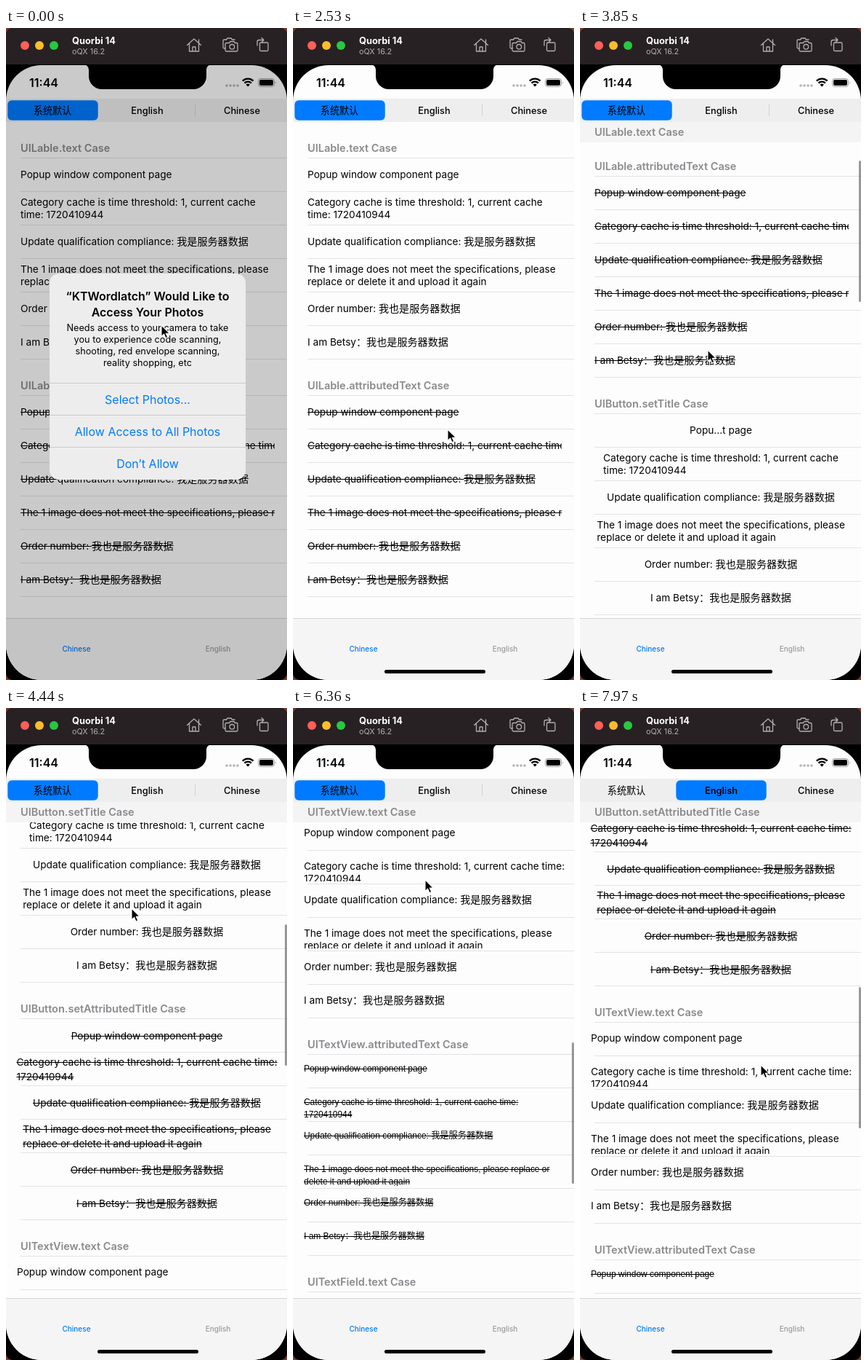
An HTML page for the animation above (8 s loop, 387 by 895 pixels).

```html
<!DOCTYPE html>
<html lang="en">
<head>
<meta charset="utf-8">
<title>Translated list demo</title>
<style>
  html, body { margin: 0; width: 100%; height: 100%; overflow: hidden; background: #7c3a2c; }
  #stage { position: relative; width: 387px; height: 895px; overflow: hidden; border-radius: 9px; background: #000;
    font-family: Inter, "Noto Sans CJK SC", "Noto Sans CJK", sans-serif; }
  #stage svg { position: absolute; left: 0; top: 0; }
  #screen { position: absolute; inset: 0; background: #fdfdfd; clip-path: inset(51px 0 0 round 49px); }
  #view { position: absolute; left: 0; top: 129px; width: 387px; height: 681px; overflow: hidden; }
  #list { position: absolute; left: 0; top: -129px; width: 100%; will-change: transform; }
  .head { position: absolute; left: 0; width: 367px; height: 28px; padding-left: 20px; color: #8a8a8e;
    font-size: 14.5px; font-weight: 600; line-height: 28px; white-space: pre; }
  #sticky { top: 0; background: #f4f4f4; }
  .line { position: absolute; left: 20px; right: 0; height: 1px; background: #e3e3e5; }
  .row { position: absolute; left: 20px; width: 350px; height: 45px; display: flex; align-items: center;
    overflow: hidden; white-space: pre; color: #000; font-size: 13.65px; line-height: 17px; }
  .row b { font-weight: 400; }
  .row i { font-style: normal; font-size: 1.033em; line-height: 1px; }
  .strike b { text-decoration: line-through 1.2px; }
  .mid { left: 0; width: 388px; justify-content: center; }
  .loose { line-height: 20px; }
  .box { left: 15px; width: 372px; height: 42px; align-items: flex-start; line-height: 16.5px; }
  .box b { margin-top: 13px; }
  .small { font-family: "Liberation Sans", "Noto Sans CJK SC", "Noto Sans CJK", sans-serif; font-size: 11.95px; }
  .small b { margin-top: 11px; }
  .small i { font-size: 1.02em; }
  #bar { position: absolute; right: 0; width: 3px; height: 194px; border-radius: 2px; background: rgba(0,0,0,.4); }
</style>
</head>
<body>
<div id="stage">
  <div id="screen">
    <div id="view">
      <div id="list"></div>
      <div id="sticky" class="head"></div>
      <div id="bar"></div>
    </div>
    <svg width="387" height="895" text-anchor="middle">
      <text x="52" y="80.5" font-size="16" font-weight="600">11:44</text>
      <path d="M304 79h16" stroke="#b4b4b6" stroke-width="3.6" stroke-linecap="round" stroke-dasharray="0 5"/>
      <path d="M325.8 72.6a10.5 10.5 0 0 1 14.8 0M328.5 75.6a6.6 6.6 0 0 1 9.4 0" fill="none" stroke="#000" stroke-width="2.3"/>
      <path d="M333.2 80.6l-2.7-2.8a3.8 3.8 0 0 1 5.4 0z"/>
      <rect x="347.5" y="69.5" width="22" height="11" rx="3.4" fill="none" stroke="#999"/>
      <rect x="349" y="71" width="19" height="8" rx="2"/>
      <path d="M371 73.2q1.8 1.8 0 3.6z" fill="#888"/>

      <rect y="97" width="387" height="32" fill="#eeeeef"/>
      <rect id="divider" x="260" y="105" width="1" height="16" fill="#d3d3d6"/>
      <rect id="pill" x="2" y="99" width="125" height="28" rx="6" fill="#007aff" stroke="#fff" stroke-opacity=".5"/>
      <g font-size="12.8" font-weight="500">
        <text id="segA" x="64" y="117.8" font-size="13.1">系统默认</text>
        <text id="segB" x="194.5" y="117.6">English</text>
        <text x="325" y="117.6">Chinese</text>
      </g>

      <rect y="810" width="387" height="85" fill="#f5f5f5"/>
      <rect y="810" width="387" height="1" fill="#d6d6d8"/>
      <g font-size="10" font-weight="500">
        <text x="97" y="856.3" fill="#007aff">Chinese</text>
        <text x="292" y="856.3" fill="#999">English</text>
      </g>
      <rect id="home" x="126" y="881" width="139" height="5" rx="2.5"/>
      <rect id="dim" y="50" width="387" height="845"/>

      <g id="alert">
        <rect x="60" y="337" width="270" height="283" rx="13" fill="#ededed"/>
        <rect id="press" x="60" y="532" width="270" height="43" fill="#d3d3d3"/>
        <path d="M60 487.5h270M60 531.5h270M60 575.5h270" stroke="#cbcbcd"/>
        <g font-size="16" font-weight="600">
          <text x="195" y="373.5">“KTWordlatch” Would Like to</text>
          <text x="195" y="395.5">Access Your Photos</text>
        </g>
        <g font-size="12.7">
          <text x="195" y="415.5">Needs access to your camera to take</text>
          <text x="195" y="431.5">you to experience code scanning,</text>
          <text x="195" y="447.5">shooting, red envelope scanning,</text>
          <text x="195" y="463.5">reality shopping, etc</text>
        </g>
        <g font-size="16" fill="#007aff">
          <text x="195" y="515.8">Select Photos...</text>
          <text x="195" y="559.8">Allow Access to All Photos</text>
          <text x="195" y="604.3">Don’t Allow</text>
        </g>
      </g>
    </svg>
  </div>
  <svg width="387" height="895">
    <rect width="387" height="50" fill="#272123"/>
    <path d="M106 50H284c-5 0-8 3-8 8v8a18 18 0 0 1-18 18H132a18 18 0 0 1-18-18v-8c0-5-3-8-8-8z"/>
    <circle cx="26" cy="24" r="6" fill="#ff5f57"/>
    <circle cx="46" cy="24" r="6" fill="#febc2e"/>
    <circle cx="66" cy="24" r="6" fill="#28c840"/>
    <text x="91" y="21.8" font-size="12.8" font-weight="700" fill="#fff">Quorbi 14</text>
    <text x="91" y="36" font-size="10.8" fill="#b3aeb0">oQX 16.2</text>
    <g fill="none" stroke="#b3aeb0" stroke-width="1.3" stroke-linejoin="round" stroke-linecap="round">
      <path d="M249.500 23.500L259 15l9.500 8.500M252.500 21.500V32h13V21.500M257 32v-6h4v6M265.500 20v-4"/>
      <path d="M302 28h-1.500q-1.500 0-1.500-1.500v-9q0-1.500 1.500-1.500h3l1.500-2h5l1.500 2h3.500"/>
      <path d="M303.500 20.500h4l1.500-2h5l1.500 2h2q1.500 0 1.500 1.500v8.500q0 1.500-1.500 1.500h-14q-1.500 0-1.500-1.500V22q0-1.500 1.500-1.500z"/>
      <circle cx="311.300" cy="25.800" r="3.300"/>
      <rect x="349.500" y="20" width="11.500" height="11.500" rx="1.500"/>
      <path d="M346 24v-5q0-2.500 2.500-2.500h6M352 13.500l3 3-3 3"/>
    </g>
    <path id="cursor" d="M0 0V15.500L3.600 12.200 6 17.800 8.700 16.600 6.300 11.200H11.200Z" fill="#000" stroke="#fff" stroke-width="1.1"/>
  </svg>
</div>
<script>
const $ = id => document.getElementById(id);
const LOOP = 8000, TICK = 147.45, PITCH = 326, PIN = 143;

const heads = ['UILable.text', 'UILable.attributedText', 'UIButton.setTitle', 'UIButton.setAttributedTitle',
  'UITextView.text', 'UITextView.attributedText', 'UITextField.text'].map(s => s + ' Case');

const texts = [
  'Popup window component page',
  'Category cache is time threshold: 1, current cache time: 1720410944',
  'Update qualification compliance: 我是服务器数据',
  'The 1 image does not meet the specifications, please replace or delete it and upload it again',
  'Order number: 我也是服务器数据',
  'I am Betsy：我也是服务器数据'
];

// Row style per section, and the words that begin a second line.
const kinds = [
  ['', 'time: 1', 'replace'],
  ['strike'],
  ['mid', 'time: 1', 'replace'],
  ['mid strike loose', '1720', 'replace'],
  ['box', '1720', 'replace'],
  ['box strike small', '1720', 'delete']
];

const div = (cls, top, html = '') => `<div class="${cls}" style="top:${top}px">${html}</div>`;
const markCjk = s => s.replace(/[\u3000-\u9fff\uff00-\uffef]+/g, '<i>$&</i>');

function buildList() {
  let html = '';
  heads.forEach((head, i) => {
    const top = 179 + PITCH * i;
    html += div('head', top - 28, head) + div('line', top - 1);
    if (!kinds[i]) return;
    const [cls, ...breaks] = kinds[i];
    texts.forEach((text, j) => {
      let s = breaks.reduce((t, w) => t.replace(' ' + w, '\n' + w), text);
      if (i === 2 && j === 0) s = 'Popu...t page';
      const y = top + 46 * j;
      html += div('row ' + cls, y, `<b>${markCjk(s)}</b>`) + div('line', y + 45);
    });
  });
  $('list').innerHTML = html;
}

const ramp = (t, from, to) => Math.min(1, Math.max(0, (t - from) / (to - from)));
const ease = f => (1 - Math.cos(Math.PI * f)) / 2;

// Where the pointer turns or rests: ms, x, y
const stops = [[0, 214, 408], [440, 249, 490], [740, 222, 533], [1770, 213, 551], [2510, 213, 551], [3240, 178, 740],
  [3834, 176, 442], [4424, 173, 275], [6340, 182, 236], [6800, 194, 112], [7080, 194, 112], [7372, 221, 249],
  [7962, 226, 531]];

function pointerAt(t) {
  const n = Math.max(1, stops.findIndex(p => p[0] >= t));
  const [t0, x0, y0] = stops[n - 1], [t1, x1, y1] = stops[n];
  const f = ramp(t, t0, t1);
  return [x0 + (x1 - x0) * f, y0 + (y1 - y0) * f];
}

// A steady run down the list, then a drag part of the way back.
const scrollAt = t => Math.round(1333 * ramp(t, 3420, 5252) - 282 * ease(ramp(t, 7372, 7962)));

function drawList(s) {
  $('list').style.transform = `translateY(${-s}px)`;
  const center = i => 165 + PITCH * i - s;
  const i = heads.findLastIndex((_, n) => center(n) < PIN);
  const sticky = $('sticky');
  sticky.style.display = i < 0 ? 'none' : 'block';
  if (i >= 0) {
    sticky.textContent = heads[i];
    sticky.style.transform = `translateY(${Math.min(0, center(i + 1) - 28 - PIN)}px)`;
  }
  $('bar').style.top = 101.5 + 0.268 * s - 129 + 'px';
}

function draw(time) {
  // The picture advances in even ticks and holds between them.
  const t = Math.max(0, Math.floor((time - 7) / TICK)) * TICK;
  const [x, y] = pointerAt(t);
  const shown = 1 - ramp(t, 2230, 2500);
  const seg = ease(ramp(t, 6930, 7225));
  $('cursor').setAttribute('transform', `translate(${x} ${y})`);
  drawList(scrollAt(t));
  $('bar').style.opacity = ramp(t, 3250, 3390) - ramp(t, 6345, 6640) + ramp(t, 7372, 7500);
  $('alert').style.opacity = shown;
  $('dim').style.opacity = 0.2 * shown;
  $('home').style.opacity = 1 - shown;
  $('press').style.opacity = t > 2000 ? 1 : 0;
  $('pill').setAttribute('x', 2 + 130 * seg);
  $('divider').style.opacity = 1 - seg;
  $('segA').style.fontWeight = seg < 0.5 ? 500 : 400;
  $('segB').style.fontWeight = seg < 0.5 ? 500 : 600;
}

buildList();
draw(0);
const start = performance.now();
(function frame() {
  draw((performance.now() - start) % LOOP);
  requestAnimationFrame(frame);
})();
</script>
</body>
</html>
```
